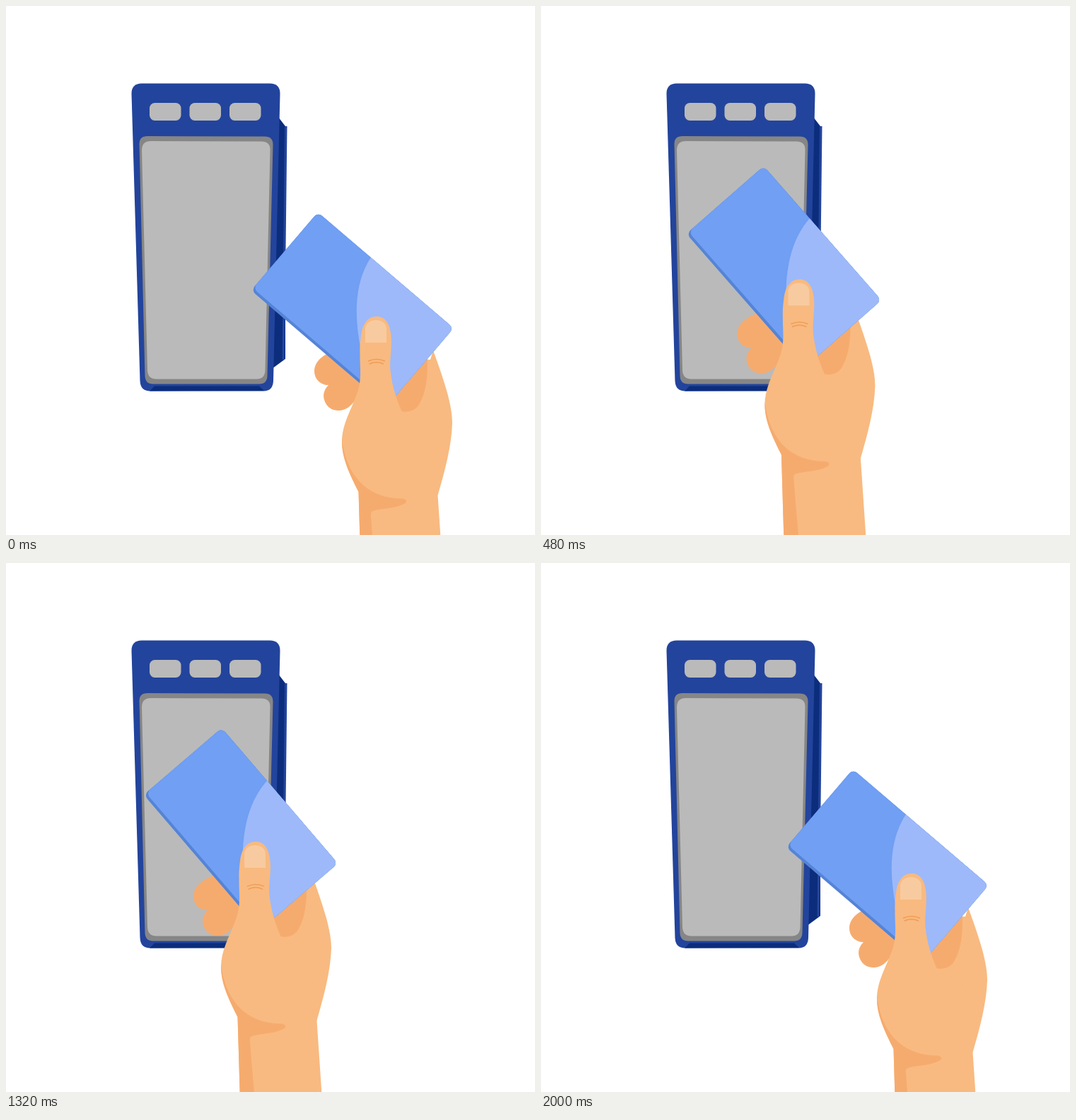
Recreate the animation shown at these times as an HTML page. Size 748 by 748 pixels, loop 2.4 s.

```html
<!DOCTYPE html>
<html lang="en">
<head>
<meta charset="utf-8">
<title>Card tap</title>
<style>
  html, body { margin: 0; width: 100%; height: 100%; overflow: hidden; background: #fff; }
  svg { display: block; width: 100%; height: 100%; }
  .blue { fill: #23449c; }
  .navy { fill: #0b2d7c; }
  .bezel { fill: #868686; }
  .grey { fill: #bababa; }
  .skin { fill: #f8ba80; }
  .shade { fill: #f6ab6e; }
  .nail { fill: #f8ca9f; }
  .crease { fill: none; stroke: #f19c55; stroke-width: 1.5; stroke-linecap: round; }
</style>
</head>
<body>
<svg viewBox="0 0 748 748">
  <defs>
    <clipPath id="face"><rect width="252.5" height="141.5" rx="8"/></clipPath>
  </defs>

  <g id="reader">
    <path class="navy" d="M385 157L395 170V499L376 513Z"/>
    <path class="blue" d="M394 170H397.5L393.7 500H390.5Z"/>
    <path class="blue" d="M192 109.5H373Q387.500 109.500 387.500 124L378 530Q377.500 544.500 364 544.500H204Q190 544.500 189.500 530L177.500 124Q177.500 109.500 192 109.500Z"/>
    <path class="navy" d="M203 544.500L210 537.500H358L365 544Z"/>
    <path class="bezel" d="M200 184L366 184.500Q377.500 184.500 377.500 196L369.500 523Q369 534.500 358 534.500H208Q197 534.500 196.500 523L188.500 195Q188.500 184 200 184Z"/>
    <path class="grey" d="M205 191L361 191.500Q374 191.500 373.500 204L366.500 515Q366 527.500 354 527.500H213Q200.500 527.500 200 515L192 204Q192 191 205 191Z"/>
    <g class="grey">
      <rect x="203" y="137" width="44.500" height="25" rx="7.500"/>
      <rect x="259.500" y="137" width="44.500" height="25" rx="7.500"/>
      <rect x="316" y="137" width="44.500" height="25" rx="7.500"/>
    </g>
  </g>

  <g id="hand">
    <!-- fingers and palm behind the card -->
    <path class="shade" d="M470 485C448 492 436 503 436 516C436 528 445 536 456 536C449 543 448 551 450 557C453 567 461 572 470 572C481 572 489 565 496 554L530 560V490Z"/>
    <path class="skin" d="M540 500H600L604 487C611 506 618 526 624 547C629 566 631 578 631 590C630 622 621 656 610.500 692L540 690Z"/>
    <path class="shade" d="M530 520L595 488C598 520 594 549 583 565C577 573 567 575 559 573L530 560Z"/>

    <g id="card">
      <rect width="252.500" height="145.500" rx="8" fill="#5584d6"/>
      <g clip-path="url(#face)">
        <rect width="253" height="142" fill="#709ff3"/>
        <path d="M98.500 0C104 40 130 75 172 108L215 142H253V0Z" fill="#9db9f9"/>
      </g>
    </g>

    <!-- thumb, wrist and arm in front -->
    <path class="skin" d="M524 439C536 439 543 449 544.500 466C546 485 542 500 543.500 515C546 538 552 556 559.500 573L600 600L610.500 692L620.500 840H503L498.500 687C485 660 475 640 475 616C475 592 488 571 496 549C504 528 500 510 500.500 492C500 482 501 474 502 466C504 449 512 439 524 439Z"/>
    <path class="shade" d="M475 612C480 655 503 696 561 696.500C567 698 568 701 563 704C550 711 530 710 519 714C516 715 515.500 717 516 721L518 748L526 840H503L498.500 687C485 660 474 636 475 612Z"/>
    <path class="nail" d="M508 476V456C509 440 537 440 538 456V476Z"/>
    <path class="crease" d="M512.500 502Q524 497 535.500 502M514 506Q524 501.500 533.500 506"/>
  </g>
</svg>
<script>
  const LOOP = 2400, STEP = 40, TURN = 1000, SWING = 640;
  const MID = [-83.1, -103.5], END = [-171, -45];
  const hand = document.getElementById('hand');
  const card = document.getElementById('card');

  // Symmetric cubic Bezier easing: (a, 0) to (1 - a, 1).
  function ease(x, a = 0.65) {
    if (x <= 0) return 0;
    if (x >= 1) return 1;
    let lo = 0, hi = 1, t = 0.5;
    for (let i = 0; i < 30; i++) {
      t = (lo + hi) / 2;
      const bx = 3 * a * t * (1 - t) ** 2 + 3 * (1 - a) * t * t * (1 - t) + t ** 3;
      if (bx < x) lo = t; else hi = t;
    }
    return t * t * (3 - 2 * t);
  }

  function draw(ms) {
    const time = Math.floor((ms % LOOP) / STEP) * STEP;
    // Forward to the turn, then the same way back, then rest.
    const t = time <= TURN ? time : Math.max(0, 2 * TURN - time);
    const s = ease(t / SWING);
    const press = 1 - 0.044 * ease((t - SWING) / (TURN - SWING));
    const [x, y] = [0, 1].map(i => 2 * s * (1 - s) * MID[i] + s * s * END[i]);
    hand.setAttribute('transform',
      `translate(${x} ${y}) translate(543 677) scale(${press}) translate(-543 -677)`);
    card.setAttribute('transform',
      `rotate(${8.9 * s} 546 510) translate(441 291.5) rotate(40.5)`);
  }

  const start = performance.now();
  function tick() {
    draw(performance.now() - start);
    requestAnimationFrame(tick);
  }
  draw(0);
  requestAnimationFrame(tick);
</script>
</body>
</html>
```
